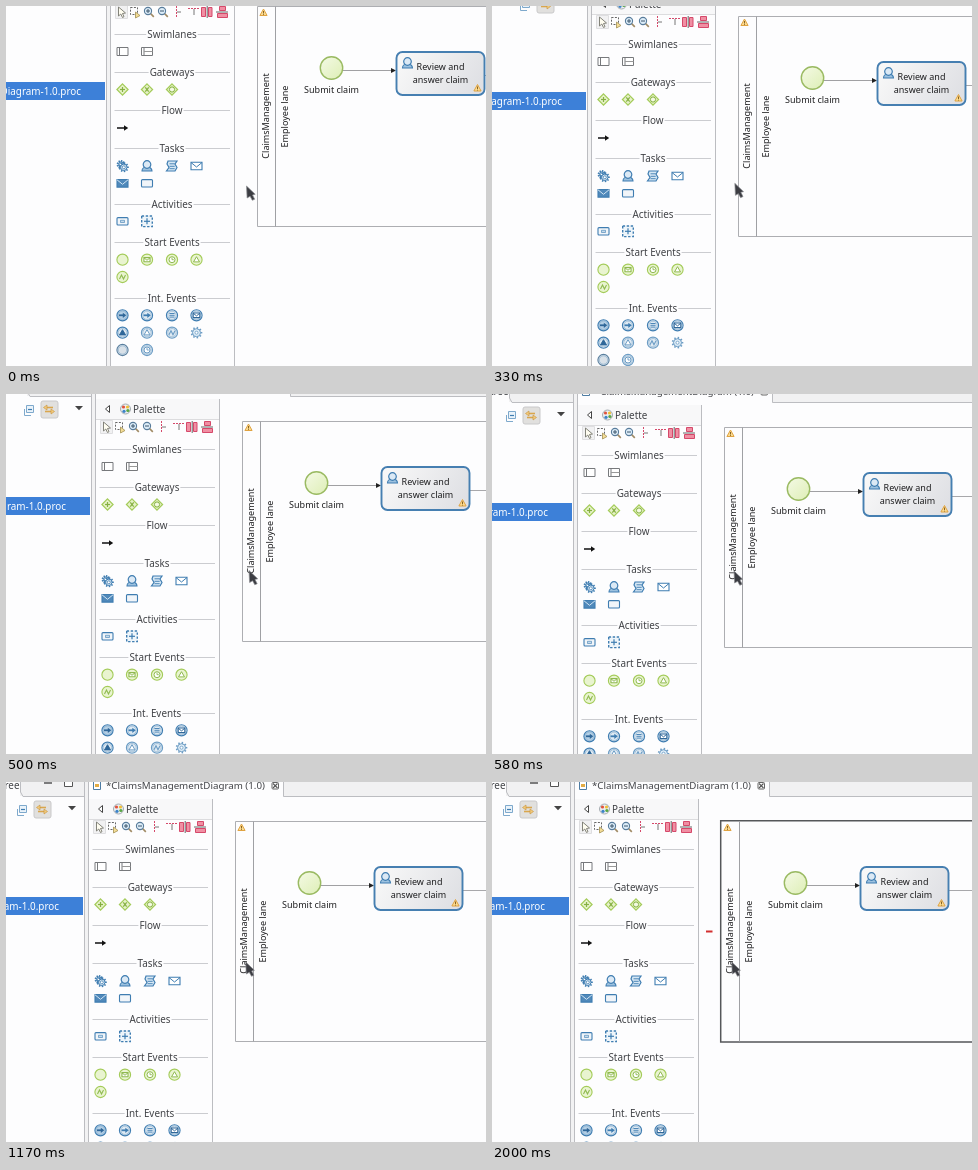
Animation of 480x360 px, one loop 2.08 s. Source, as an HTML page with a canvas:

```html
<!DOCTYPE html>
<html lang="en">
<head>
<meta charset="utf-8">
<title>Process editor</title>
<style>
html, body { margin: 0; width: 100%; height: 100%; overflow: hidden; background: #fdfdfe; }
canvas { display: block; }
</style>
</head>
<body>
<canvas id="stage" width="480" height="360"></canvas>
<script>
const c = document.getElementById('stage').getContext('2d');
const LOOP = 2080, STEP = 1000 / 12;
const FAMILY = '"Noto Sans", "Open Sans", sans-serif';
const BG = '#fdfdfe', INK = '#404246', GREY = '#bcbdc1', BLUE = '#3f7db1', GREEN = '#a3cb58';
const COLS = [94.5, 119, 144, 168.5];

function line(points, color, width = 1, fill) {
  c.beginPath();
  for (let i = 0; i < points.length; i += 2) c.lineTo(points[i], points[i + 1]);
  if (fill) { c.closePath(); c.fillStyle = fill; c.fill(); }
  if (color) { c.strokeStyle = color; c.lineWidth = width; c.stroke(); }
}

function finish(fill, stroke, width) {
  if (fill) { c.fillStyle = fill; c.fill(); }
  if (stroke) { c.strokeStyle = stroke; c.lineWidth = width; c.stroke(); }
}

function box(x, y, w, h, fill, stroke, width = 1, r = 0) {
  c.beginPath();
  c.roundRect(x, y, w, h, r);
  finish(fill, stroke, width);
}

function disc(x, y, r, fill, stroke, width = 1) {
  c.beginPath();
  c.arc(x, y, r, 0, Math.PI * 2);
  finish(fill, stroke, width);
}

function dashed(pattern, draw) {
  c.setLineDash(pattern);
  draw();
  c.setLineDash([]);
}

function text(s, x, y, size = 9.9, align = 'center', color = INK) {
  c.font = size + 'px ' + FAMILY;
  c.textAlign = align;
  c.fillStyle = color;
  c.fillText(s, x, y);
}

function upright(s, x, y) {
  c.save();
  c.translate(x, y);
  c.rotate(-Math.PI / 2);
  text(s, 0, 3, 9.05, 'center', '#1d1d1f');
  c.restore();
}

function at(x, y, draw) {
  c.save();
  c.translate(x, y);
  draw();
  c.restore();
}

function shade(x0, y0, x1, y1, a, b) {
  const g = c.createLinearGradient(x0, y0, x1, y1);
  g.addColorStop(0, a);
  g.addColorStop(1, b);
  return g;
}

function warning(x, y) {
  at(x, y, () => {
    line([0, -3.5, 3.6, 3, -3.6, 3], '#e0a341', 1, '#fbdc93');
    line([0, -1.5, 0, 1], '#8a6420', 1);
    line([0, 1.7, 0, 2.5], '#8a6420', 1);
  });
}

// Small glyphs, each centred on 0,0
const glyph = {
  lane() { box(-5.5, -4, 11, 8, '#fff', '#77797c'); line([-3, -4, -3, 4], '#77797c'); },
  lanes() { glyph.lane(); line([-3, 0, 5.5, 0], '#999'); },
  gate(inner) {
    line([0, -5.6, 5.6, 0, 0, 5.6, -5.6, 0], GREEN, 1.2, '#e6f2c8');
    inner();
  },
  plus(color = '#86b043', r = 2.5) { line([-r, 0, r, 0], color, 1.2); line([0, -r, 0, r], color, 1.2); },
  cross() { line([-1.7, -2.2, 1.7, 2.2], '#86b043', 1.2); line([1.7, -2.2, -1.7, 2.2], '#86b043', 1.2); },
  ring() { disc(0, 0, 2.6, '#f3f9e3', '#86b043'); },
  arrow() { line([-5.5, 0, 2, 0], '#111', 1.5); line([1.5, -2.8, 5.7, 0, 1.5, 2.8], null, 0, '#111'); },
  gear(color = BLUE, r = 4) {
    for (let i = 0; i < 9; i++) {
      const a = i * Math.PI * 2 / 9, x = Math.cos(a), y = Math.sin(a);
      line([x * r, y * r, x * (r + 1.8), y * (r + 1.8)], color, 1.5);
    }
    disc(0, 0, r, '#dcebf6', color, 1);
    disc(0, 0, 1.5, '#fff', color, 0.8);
  },
  gears() {
    at(-1.5, -1.5, () => glyph.gear(BLUE, 2.6));
    at(1.3, 1.3, () => glyph.gear(BLUE, 3.2));
  },
  user() {
    c.beginPath();
    c.ellipse(0, 5, 5, 4.2, 0, Math.PI, 0);
    c.closePath();
    finish('#9cc1df', BLUE, 1.1);
    disc(0, -1.5, 3.8, '#dbe9f5', BLUE, 1.2);
  },
  script() {
    line([-4, -5, 5, -5, 3, -2, 5, 1.5, 3, 5, -5.5, 5, -3, 1.5, -5, -2], BLUE, 1.2, '#d7e8f5');
    for (const y of [-2.2, 0.3, 2.7]) line([-2.5, y, 2.7, y], BLUE, 0.9);
  },
  mail(fill = '#fff', edge = BLUE, k = 1) {
    box(-5.5 * k, -3.8 * k, 11 * k, 7.6 * k, fill, edge, 1.1);
    line([-5.5 * k, -3.5 * k, 0, 1 * k, 5.5 * k, -3.5 * k], fill === '#fff' ? edge : '#cfe3f3', 1);
  },
  task() { box(-5.5, -3.7, 11, 7.4, '#f1f5f9', BLUE, 1.1, 1); },
  call() { glyph.task(); box(-2, -1, 4, 2.2, '#c5dbec', BLUE, 0.6); },
  sub() {
    dashed([2.4, 1.6], () => box(-5.3, -5.3, 10.6, 10.6, '#eef5fa', BLUE, 1.4));
    glyph.plus(BLUE, 3);
  },
  tri(color, fill) { line([0, -3, 3, 2.2, -3, 2.2], color, 1, fill); },
  clock(color) { disc(0, 0, 3, '#fff', color); line([0, -2, 0, 0, 1.8, 0], color, 0.9); },
  zig(color) { line([-3, 2, -1, -2, 1, 2, 3, -2], color, 1.1); },
  go(color) { line([-3.5, 0, 1, 0], color, 1.8); line([0.3, -2.6, 3.8, 0, 0.3, 2.6], null, 0, color); },
  rows(color) { for (const y of [-1.8, 0, 1.8]) line([-2.6, y, 2.6, y], color, 0.9); }
};

function event(x, y, color, fill, inner) {
  at(x, y, () => {
    disc(0, 0, 5.6, fill, color, 1.1);
    if (inner) inner();
  });
}

const start = (x, y, inner) => event(x, y, GREEN, '#e9f4d0', inner);
function inter(x, y, inner, edge = BLUE, fill = '#dfeaf3') {
  event(x, y, edge, fill, () => { disc(0, 0, 4.2, null, '#8db2d0', 0.7); inner(); });
}

function row(y, draws) {
  draws.forEach((d, i) => at(COLS[i], y, d));
}

function heading(s, y) {
  text(s, 144, y + 4);
  const half = c.measureText(s).width / 2 + 1;
  line([86.5, y + 0.5, 144 - half, y + 0.5], '#cbccd0');
  line([144 + half, y + 0.5, 202, y + 0.5], '#cbccd0');
}

function explorer() {
  box(-40, -10, 118, 24, '#f1f1f2');
  box(-40, -10, 54, 24, BG);
  line([14.5, -10, 14.5, 10, 17, 14.5, 78, 14.5], GREY);
  text('Project tree', 13.5, 7, 9.9, 'right');
  line([38, 1, 46, 1], '#555', 1.5);
  box(58.5, -3.5, 8, 8, '#fff', '#555');
  box(13.5, 23.5, 7, 7, '#eaf3fa', '#7ea9cc');
  line([11.5, 27, 11.5, 33.5, 18, 33.5], '#7ea9cc');
  line([15, 27.5, 19, 27.5], BLUE, 1.2);
  box(28, 19, 17, 17, '#e1e0de', '#c9c9ca', 1, 2);
  for (const [y, s] of [[25.5, -1], [29.5, 1]]) {
    line([36 - s * 4, y, 36 + s * 3, y], '#d9a64d', 1.6);
    line([36 + s * 2, y - 2.5, 36 + s * 5.5, y, 36 + s * 2, y + 2.5], '#c8923a', 0.6, '#f2cb7c');
  }
  line([62, 24, 70, 24, 66, 28.3], null, 0, '#444');
  box(-40, 115, 117, 18, '#3d80d8');
  text('Diagram-1.0.proc', 53, 128, 9.9, 'right', '#fff');
  line([78.5, -10, 78.5, 420], GREY);
  box(79, -10, 3, 430, '#f2f2f3');
  line([82.5, -10, 82.5, 420], GREY);
}

function tabs() {
  box(83, -10, 450, 25, '#f1f1f2');
  box(83, -10, 194, 27, BG);
  line([277.5, -10, 277.5, 14.5, 530, 14.5], GREY);
  box(87.5, -1.5, 7, 9, '#fff', '#4d7ca3');
  box(89, 2, 4, 3, '#e2ac45');
  text('*ClaimsManagementDiagram (1.0)', 100, 7, 9.75, 'left');
  box(266, 0.5, 6.5, 6.5, '#fff', '#666', 1, 1);
  line([267, 1.5, 271.5, 6], '#555', 1.1);
  line([271.5, 1.5, 267, 6], '#555', 1.1);
}

function zoom(x, plus) {
  at(x, 45, () => {
    line([1.5, 1.5, 4.8, 4.8], '#a08a64', 1.7);
    disc(-1, -1, 3.6, '#dcecf8', '#587c9b', 1.1);
    line([-3, -1, 1, -1], '#3c566c');
    if (plus) line([-1, -3, -1, 1], '#3c566c');
  });
}

function tools() {
  box(83, 17, 123, 20, '#f8f8f9');
  line([96.5, 23.5, 96.5, 30.5, 92.5, 27], '#444', 1, '#fff');
  disc(112.5, 27, 5, '#eceff1', '#a4abb0');
  [['#e0523d', -2, -2], ['#f0bf35', 2, -2], ['#58a646', 2.4, 1.5], ['#3d83c8', -1.5, 2.3]]
    .forEach(([k, x, y]) => disc(112.5 + x, 27 + y, 1.6, k));
  text('Palette', 120, 31, 9.9, 'left');
  line([83, 37.5, 206, 37.5], '#dcdcde');

  box(87.5, 38.5, 12, 13, '#f1f1f2', '#dedee0');
  line([90.5, 40, 90.5, 49, 92.8, 47, 94.5, 50.5, 96, 49.7, 94.5, 46.5, 97.5, 46], '#77776e', 0.9, '#fffdf0');
  dashed([2, 1.4], () => box(102.5, 40.5, 7, 7, null, '#666'));
  line([107.5, 45, 107.5, 51, 112, 48.5], '#a39052', 0.8, '#f4dd96');
  zoom(121, true);
  zoom(135, false);
  const red = '#d5496a', pink = '#f08fa3';
  dashed([2, 1], () => {
    line([148.5, 39, 148.5, 51], red);
    line([160, 41.5, 172, 41.5], red);
  });
  line([149, 45, 153, 45], '#777');
  line([166, 42, 166, 48], '#777');
  box(173.5, 40.5, 4, 9, pink, red);
  box(180.5, 40.5, 3.5, 9, pink, red);
  line([179.2, 39, 179.2, 51], '#666');
  box(191.5, 39.5, 6, 4, pink, red);
  box(189.5, 46.5, 10, 4, pink, red);
  line([188, 45, 200, 45], '#666');
}

function palette() {
  line([206.5, 17, 206.5, 420], GREY);
  tools();
  heading('Swimlanes', 67);
  row(84.5, [glyph.lane, glyph.lanes]);
  heading('Gateways', 105);
  row(122.5, [glyph.plus, glyph.cross, glyph.ring].map(g => () => glyph.gate(() => g())));
  heading('Flow', 143);
  row(161, [glyph.arrow]);
  heading('Tasks', 181);
  row(199, [glyph.gears, glyph.user, glyph.script, () => glyph.mail()]);
  row(216.3, [() => glyph.mail('#5089ba'), glyph.task]);
  heading('Activities', 237);
  row(254.3, [glyph.call, glyph.sub]);
  heading('Start Events', 275);
  const g = '#8fb950';
  [null, () => glyph.mail('#fff', g, 0.55), () => glyph.clock(g), () => glyph.tri(g, '#fff')]
    .forEach((d, i) => start(COLS[i], 292.7, d));
  start(COLS[0], 310, () => glyph.zig(g));
  heading('Int. Events', 331);
  const dark = '#2f6799', pale = '#6c9cc4';
  [() => glyph.go(dark), () => glyph.go(BLUE), () => glyph.rows(BLUE), () => glyph.mail('#fff', dark, 0.6)]
    .forEach((d, i) => inter(COLS[i], 348.3, d, BLUE, i ? '#dfeaf3' : '#b5d0e6'));
  inter(COLS[0], 365.7, () => glyph.tri(dark, dark));
  inter(COLS[1], 365.7, () => glyph.tri(pale, '#fff'), pale);
  inter(COLS[2], 365.7, () => glyph.zig(pale), pale);
  at(COLS[3], 365.7, () => glyph.gear(pale));
  inter(COLS[0], 383, () => {}, '#5a7f9e', '#d9e1e8');
  inter(COLS[1], 383, () => glyph.clock(pale), pale);
}

function diagram(hover) {
  if (hover) box(228.7, 38.7, 320, 221.3, null, '#55575a', 1.5);
  else box(229.5, 39.5, 320, 220, null, '#adaeb2');
  line([247.5, 39.5, 247.5, 259.5], '#9fa0a4');
  warning(235.5, 45.5);
  upright('ClaimsManagement', 238.3, 149);
  upright('Employee lane', 257, 149.5);

  line([315, 103.5, 364, 103.5], '#a0a0a3');
  line([363, 101, 368, 103.5, 363, 106], null, 0, '#222');
  line([457, 108.5, 530, 108.5], '#a8a8ab');
  disc(303.5, 101, 11.2, shade(296, 93, 311, 109, '#f1f8de', '#e1f0bd'), '#9aba62', 1.4);
  text('Submit claim', 303.5, 126, 9, 'center', '#1d1d1f');

  box(368.5, 85, 88, 43, shade(372, 88, 446, 130, '#f8f8f8', '#dfe0e4'), '#467fb1', 1.9, 6);
  at(379.5, 96, glyph.user);
  text('Review and', 412.5, 103, 9, 'center', '#1d1d1f');
  text('answer claim', 412.5, 116, 9, 'center', '#1d1d1f');
  warning(449.5, 121);

  if (hover) line([214, 149.5, 220.5, 149.5], '#d22f2f', 2);
}

const POINTER = [[0, 240.5, 180], [167, 240.5, 180], [417, 244, 176], [583, 242, 177], [750, 239.7, 180], [LOOP, 239.7, 180]];

function pointer(t) {
  const i = POINTER.findIndex(p => p[0] > t);
  const [t0, x0, y0] = POINTER[i - 1], [t1, x1, y1] = POINTER[i];
  const k = (t - t0) / (t1 - t0);
  at(x0 + (x1 - x0) * k, y0 + (y1 - y0) * k, () =>
    line([0, 0, 8.7, 8.3, 6, 9, 8.2, 13.2, 5.8, 14.3, 3.6, 10.3, 0.6, 12], '#8c8d91', 0.7, '#3c3d43'));
}

function ease(p) {
  p = Math.min(1, Math.max(0, p));
  return p < 0.5 ? (2 * p) ** 2.5 / 2 : 1 - (2 - 2 * p) ** 2.5 / 2;
}

function paint(now) {
  const t = Math.floor((now % LOOP + 4) / STEP) * STEP;
  const left = 1 - ease((t - 24) / 812);
  c.fillStyle = BG;
  c.fillRect(0, 0, 480, 360);
  // The view pans by whole pixels
  at(Math.round(22.4 * left), Math.round(-39 * left), () => {
    explorer();
    tabs();
    palette();
    diagram(t > 1245);
  });
  pointer(Math.min(t, LOOP - 1));
}

let begun;
function tick(now) {
  begun ??= now;
  paint(now - begun);
  requestAnimationFrame(tick);
}
paint(0);
requestAnimationFrame(tick);
</script>
</body>
</html>
```
